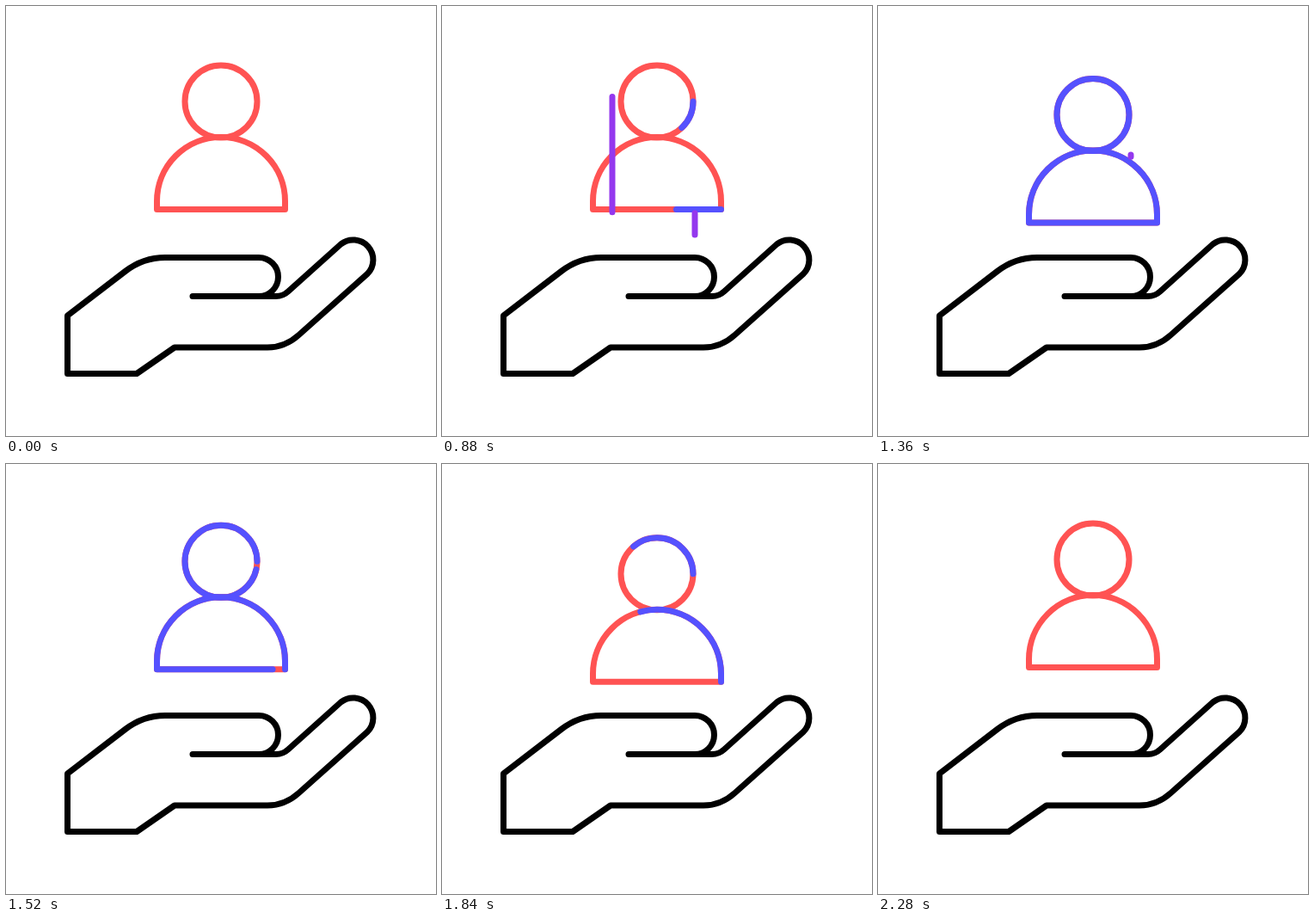
An HTML page for the animation above (3000 ms loop, 500 px wide and 500 px high).

```html
<!DOCTYPE html>
<html lang="en">
<head>
<meta charset="utf-8">
<title>Person above an open hand</title>
<style>
  html, body { margin: 0; width: 100%; height: 100%; overflow: hidden; background: #fff; }
  svg { display: block; width: 100vw; height: 100vh; }
  .line { fill: none; stroke: #000; stroke-width: 7; stroke-linecap: round; stroke-linejoin: round; }
  .red { stroke: #ff5353; }
  .blue { stroke: #5551ff; }
  .purple { stroke: #9438ee; }
</style>
</head>
<body>
<svg viewBox="0 0 500 500">
  <defs>
    <circle id="head" cx="250" cy="111" r="42" pathLength="1"/>
    <path id="body" d="M324.5 236.5H175.5V227A74.5 74.5 0 0 1 324.5 227Z" pathLength="1"/>
  </defs>
  <path class="line" d="M217 337.5H314Q322 337.5 328 332L389.3 277A23.2 23.2 0 0 1 420.3 311.4L340.5 382.5Q324.5 397 304 397H196L152 427.5H71.5V360L138.5 308.6Q159.5 292.5 185 292.5H294A22.5 22.5 0 0 1 294 337.5"/>
  <g id="person" class="line">
    <use href="#head" class="red"/>
    <use href="#body" class="red"/>
    <g id="fill" class="blue">
      <use href="#head"/>
      <use href="#body"/>
    </g>
  </g>
  <path id="left" class="line purple" d="M198 259V91.5" pathLength="1"/>
  <path id="right" class="line purple" d="M294 266V173" pathLength="1"/>
</svg>
<script>
const LOOP = 3000, STEP = 40;
const BOB = [880, 1215, 1600, 1960, 2290], DROP = 22.5;
const get = id => document.getElementById(id);
const person = get('person'), fill = get('fill'), left = get('left'), right = get('right');

// Sine ease from 0 to 1 between two times
function ease(t, from, to) {
  const x = Math.min(1, Math.max(0, (t - from) / (to - from)));
  return (1 - Math.cos(Math.PI * x)) / 2;
}

// Show only the part of a stroke between two fractions of its length
function trim(el, start, end) {
  el.style.visibility = end - start > 0.0005 ? 'visible' : 'hidden';
  el.style.strokeDasharray = `${end - start} 2`;
  el.style.strokeDashoffset = -start;
}

// A line whose tip runs ahead of its tail
function streak(el, t, from) {
  trim(el, ease(t, from + 260, from + 670), ease(t, from, from + 430));
}

function bob(t) {
  let sum = 0;
  for (let i = 1; i < BOB.length; i++) {
    sum += (i % 2 ? 1 : -1) * ease(t, BOB[i - 1], BOB[i]);
  }
  return DROP * sum;
}

function draw(now) {
  const t = Math.floor((now % LOOP) / STEP) * STEP;
  person.setAttribute('transform', `translate(0 ${bob(t).toFixed(2)})`);
  trim(fill, ease(t, 1437, 2122), ease(t, 770, 1239));
  streak(left, t, 530);
  streak(right, t, 730);
}

let origin;
function tick(now) {
  origin ??= now;
  draw(now - origin);
  requestAnimationFrame(tick);
}
draw(0);
requestAnimationFrame(tick);
</script>
</body>
</html>
```
